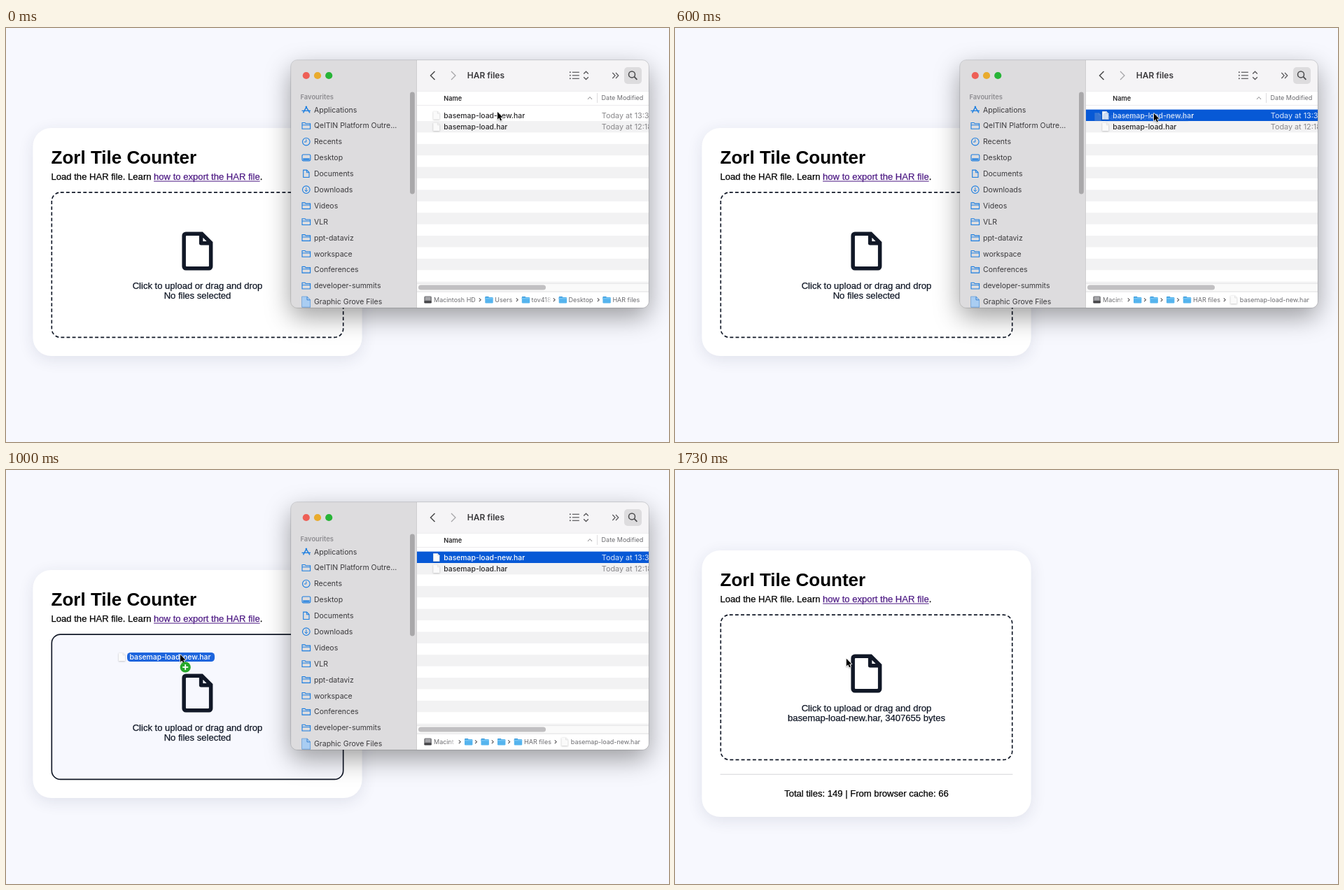
Write an HTML page with a canvas that moves like this. It is 947x592 px and loops after 4270 ms.

```html
<!DOCTYPE html>
<html lang="en">
<head>
<meta charset="utf-8">
<title>Tile Counter</title>
<style>
  html, body { margin: 0; width: 100%; height: 100%; overflow: hidden; background: #f7f8fe; }
  canvas { display: block; width: 947px; height: 592px; }
</style>
</head>
<body>
<canvas id="stage"></canvas>
<script>
const W = 947, H = 592, LOOP = 4270;
const canvas = document.getElementById('stage');
const c = canvas.getContext('2d');
const scale = Math.max(1, window.devicePixelRatio || 1);
canvas.width = W * scale;
canvas.height = H * scale;

const PAGE_FONT = '"Liberation Sans", Arial, sans-serif';
const UI_FONT = 'Inter, "Open Sans", sans-serif';
const BACK = '#f7f8fe', INK = '#111827', BLUE = '#1a7de0', FILE = 'basemap-load-new.har';

// time, pointer x, y
const POINTER = [
  [0, 702, 120], [130, 702, 119.5], [330, 701, 119], [400, 700.5, 119],
  [600, 684, 122], [660, 625, 136], [730, 544, 156], [800, 466, 181],
  [870, 385, 212], [930, 306, 246], [1000, 249, 264], [1070, 248, 264.5],
  [1130, 247, 266], [1200, 246, 268], [1270, 244.8, 269.7]
];
// time, dragged label x, y, opacity
const DRAG = [
  [600, 615, 127, .2], [660, 575, 135, .35], [730, 512, 149, .5], [800, 432, 172, .65],
  [870, 335, 208, .85], [930, 245, 246, .95], [1000, 176.5, 267.5, 1], [1070, 175.5, 268.5, 1],
  [1130, 174.5, 270, 1], [1200, 173, 272, 1], [1270, 171.5, 273, 1]
];
const SELECT = 200, HOVER = 930, DROP = 1670, RESULT = 1730;

const stepAt = (steps, t) => steps.filter(s => s[0] <= t).pop();

function rr(x, y, w, h, r) {
  c.beginPath();
  c.roundRect(x, y, w, h, r);
}

function fillRR(x, y, w, h, r, color) {
  rr(x, y, w, h, r);
  c.fillStyle = color;
  c.fill();
}

function rect(x, y, w, h, color) {
  c.fillStyle = color;
  c.fillRect(x, y, w, h);
}

function disc(x, y, r, color) {
  c.beginPath();
  c.arc(x, y, r, 0, 7);
  c.fillStyle = color;
  c.fill();
}

function line(points, color, width = 1, closed = false) {
  c.beginPath();
  for (let i = 0; i < points.length; i += 2) c.lineTo(points[i], points[i + 1]);
  if (closed) c.closePath();
  c.strokeStyle = color;
  c.lineWidth = width;
  c.stroke();
}

function text(s, x, y, font, color, align = 'left') {
  c.font = font;
  c.fillStyle = color;
  c.textAlign = align;
  c.fillText(s, x, y);
}

// y is the middle of the capitals
function label(s, x, y, size, color, weight = 400) {
  text(s, x, y + size * .36, `${weight} ${size}px ${UI_FONT}`, color);
}

function fadingLabel(s, x, y, size, width) {
  const g = c.createLinearGradient(x, 0, x + width, 0);
  g.addColorStop(0, '#6c6c70');
  g.addColorStop(.65, '#6c6c70');
  g.addColorStop(1, 'rgba(108,108,112,0)');
  label(s, x, y, size, g);
}

function shadow(color, blur, dy) {
  c.shadowColor = color;
  c.shadowBlur = blur * scale;
  c.shadowOffsetY = dy * scale;
}

// ---------- web page ----------
const ICON = new Path2D('M6 2h8.7L20 7.3V20a2 2 0 0 1-2 2H6a2 2 0 0 1-2-2V4a2 2 0 0 1 2-2z' +
  'M6.4 4a.4.4 0 0 0-.4.4v15.2a.4.4 0 0 0 .4.4h11.2a.4.4 0 0 0 .4-.4V8.9h-4.1a1 1 0 0 1-1-1V4z' +
  'M14.9 5v1.9h1.9z');

// a hairline stroke gives the page text its slightly heavier look
function pageText(s, x, y, color, align) {
  text(s, x, y, `13.05px ${PAGE_FONT}`, color, align);
  c.strokeStyle = color;
  c.lineWidth = .25;
  c.strokeText(s, x, y);
  return c.measureText(s).width;
}

function dropZone(top, hover) {
  const x = 65.3, y = top + 92.1, w = 416.4, h = 207.3, r = 12.5;
  rr(x, y, w, h, r);
  c.strokeStyle = INK;
  c.lineWidth = 1.65;
  if (hover) {
    c.fillStyle = BACK;
    c.fill();
  } else {
    const length = 2 * (w + h) - 8 * r + 2 * Math.PI * r;
    const dash = 4.9, count = Math.round(length / 8.125);
    c.setLineDash([dash, length / count - dash]);
  }
  c.stroke();
  c.setLineDash([]);
}

function page(t) {
  const done = t >= RESULT, top = done ? 115 : 143;
  c.save();
  shadow('rgba(40,45,80,.11)', 22, 5);
  fillRR(38.4, top, 470.2, done ? 381 : 326, 26, '#fff');
  c.restore();

  text('Zorl Tile Counter', 64.6, top + 50.8, `bold 26px ${PAGE_FONT}`, '#000');
  const base = top + 74.1, linkColor = '#4f1c85';
  let x = 64.6 + pageText('Load the HAR file. Learn ', 64.6, base, '#000');
  const linkWidth = pageText('how to export the HAR file', x, base, linkColor);
  rect(x, base + 1.5, linkWidth, 1, linkColor);
  pageText('.', x + linkWidth, base, '#000');

  dropZone(top, t >= HOVER && t < DROP);
  c.save();
  c.translate(251.4 - 4 * 2.75, top + 148.5 - 2 * 2.75);
  c.scale(2.75, 2.75);
  c.fillStyle = INK;
  c.fill(ICON, 'evenodd');
  c.restore();
  pageText('Click to upload or drag and drop', 273.5, top + 229.7, INK, 'center');
  pageText(t < DROP ? 'No files selected' : FILE + ', 3407655 bytes', 273.5, top + 244.4, INK, 'center');

  if (done) {
    rect(64.6, 434.7, 417.8, 1, '#d3d4d8');
    pageText('Total tiles: 149 | From browser cache: 66', 273.5, 466.5, '#000', 'center');
  }
}

// ---------- file browser ----------
const sideIcons = {
  apps(y) {
    line([424.5, y + 4.5, 429.6, y - 5], BLUE, 1.4);
    line([434, y + 4.5, 428, y - 5], BLUE, 1.4);
    line([422.5, y + 1.6, 435, y + 1.6], BLUE, 1.4);
  },
  folder(y) {
    line([423, y - 4.2, 427, y - 4.2, 428.2, y - 3, 434.6, y - 3, 434.6, y + 4.5, 423, y + 4.5], BLUE, 1.1, true);
    line([423, y - .9, 434.6, y - .9], BLUE, 1);
  },
  ring(y) {
    c.beginPath();
    c.arc(428.8, y, 5.3, 0, 7);
    c.strokeStyle = BLUE;
    c.lineWidth = 1.1;
    c.stroke();
  },
  clock(y) {
    this.ring(y);
    line([428.8, y - 3.4, 428.8, y + .4, 425.8, y + .4], BLUE, 1);
  },
  desktop(y) {
    rr(423, y - 4.4, 11.8, 8.8, 1.5);
    c.strokeStyle = BLUE;
    c.lineWidth = 1.1;
    c.stroke();
    rect(424.2, y + 1, 9.4, 2.2, BLUE);
  },
  doc(y) {
    line([424.7, y - 5.2, 429.6, y - 5.2, 433, y - 1.8, 433, y + 5.2, 424.7, y + 5.2], BLUE, 1.1, true);
    line([429.4, y - 5, 429.4, y - 1.6, 433, y - 1.6], BLUE, 1);
  },
  download(y) {
    this.ring(y);
    line([428.8, y - 3, 428.8, y + 2.6], BLUE, 1);
    line([426.6, y + .4, 428.8, y + 2.7, 431, y + .4], BLUE, 1);
  },
  sheet(y) {
    c.fillStyle = '#a9cdf2';
    line([423, y - 7, 430, y - 7, 434.5, y - 2.5, 434.5, y + 7.5, 423, y + 7.5], '#3b82cf', 1.1, true);
    c.fill();
    line([430, y - 7, 430, y - 2.5, 434.5, y - 2.5], '#3b82cf', 1);
  }
};

const SIDEBAR = [
  ['apps', 'Applications'], ['folder', 'QelTIN Platform Outre...'], ['clock', 'Recents'],
  ['desktop', 'Desktop'], ['doc', 'Documents'], ['download', 'Downloads'],
  ['folder', 'Videos'], ['folder', 'VLR'], ['folder', 'ppt-dataviz'],
  ['folder', 'workspace'], ['folder', 'Conferences'], ['folder', 'developer-summits'],
  ['sheet', 'Graphic Grove Files']
];

function sidebar() {
  rect(407, 46, 179.5, 354, '#dddcde');
  ['#ee5f56', '#e9ab2d', '#27b437'].forEach((color, i) => disc(428.8 + i * 16.2, 68, 5.1, color));
  label('Favourites', 420.5, 98.3, 9.4, '#8d8c90', 600);
  SIDEBAR.forEach(([icon, name], i) => {
    const y = 116.8 + i * 22.88;
    sideIcons[icon](y);
    label(name, 440, y, 10.5, '#3a393c');
  });
  fillRR(577, 91.5, 6.8, 146, 3.4, '#a9a8aa');
  rect(586, 46, 1, 354, '#cfced0');
}

function toolbar() {
  rect(587, 46, 331, 44, '#f5f4f6');
  line([612.5, 62, 606.5, 68, 612.5, 74], '#4a4a4c', 1.5);
  line([636, 62, 642, 68, 636, 74], '#a5a5a8', 1.3);
  label('HAR files', 658.8, 68, 12, '#3a393c', 600);
  for (const y of [63.3, 67.8, 72.3]) {
    disc(805.8, y, 1, '#59585b');
    rect(808.8, y - .6, 10, 1.2, '#59585b');
  }
  line([825.2, 65.6, 828.5, 62.3, 831.8, 65.6], '#59585b', 1.4);
  line([825.2, 70.2, 828.5, 73.5, 831.8, 70.2], '#59585b', 1.4);
  for (const x of [866.3, 871]) line([x, 64, x + 3.8, 68, x, 72], '#59585b', 1.2);
  fillRR(883, 56, 25, 24, 5, '#dddcde');
  c.beginPath();
  c.arc(894, 66.4, 4.5, 0, 7);
  c.strokeStyle = '#4a4a4c';
  c.lineWidth = 1.5;
  c.stroke();
  line([897.3, 69.7, 901.4, 73.8], '#4a4a4c', 1.7);
}

function pageIcon(x, y) {
  c.save();
  shadow('rgba(0,0,0,.3)', 2, .5);
  c.beginPath();
  c.moveTo(x - 4.6, y - 5.8);
  c.lineTo(x + 1.6, y - 5.8);
  c.lineTo(x + 4.6, y - 2.8);
  c.lineTo(x + 4.6, y + 5.8);
  c.lineTo(x - 4.6, y + 5.8);
  c.fillStyle = '#fafafa';
  c.fill();
  c.restore();
  line([x + 1.6, y - 5.8, x + 1.6, y - 2.8, x + 4.6, y - 2.8], '#d8d8da', .7);
}

function fileList(selected) {
  const pitch = 16.4, first = 116.6;
  rect(587, 90, 331, 310, '#fff');
  for (let i = 1; i < 16; i += 2) rect(587, first + i * pitch, 331, pitch, '#f2f2f3');
  if (selected) rect(587, first, 331, pitch, '#0759d6');
  [[FILE, 'Today at 13:37'], ['basemap-load.har', 'Today at 12:18']].forEach(([name, date], i) => {
    const y = 125 + i * pitch, on = selected && i === 0;
    pageIcon(614.8, y);
    label(name, 625.2, y, 10.4, on ? '#fff' : '#29282a', 500);
    label(date, 850.8, y, 10.8, on ? '#dce8fb' : '#88878a');
  });

  rect(587, 89.5, 331, 1, '#dedddf');
  label('Name', 625.2, 100.2, 9.2, '#29282a', 600);
  line([831, 102, 834, 98.6, 837, 102], '#88878a', 1);
  rect(844, 93, 1, 14, '#dedddf');
  label('Date Modified', 850.6, 100.2, 9, '#6c6c70');
  rect(587, 110, 331, .7, '#e4e3e5');

  rect(587, 365.5, 331, 11.5, '#fafafa');
  rect(587, 365, 331, .8, '#e6e6e8');
  fillRR(589, 367.6, 182, 7, 3.5, '#c1c0c2');
}

function smallFolder(x) {
  fillRR(x, 384, 5.5, 4, 1, '#3593d6');
  fillRR(x, 385, 11.4, 8.4, 1.2, '#55b4ee');
  rect(x, 386.4, 11.4, .8, '#8dd0f7');
}

function drive() {
  fillRR(597.3, 383.5, 10.6, 10.2, 1.5, '#77777a');
  rect(598.8, 384.5, 7.6, 5, '#a5a5a9');
  rect(597.6, 390.4, 10, 2.6, '#434346');
}

function pathBar(selected) {
  const y = 388.7, size = 9, gray = '#6c6c70';
  rect(587, 377, 331, 23, '#fff');
  rect(587, 376.6, 331, .9, '#dcdbdd');
  drive();
  const arrows = selected ? [648, 671.3, 695, 718.5, 785] : [677, 730, 783, 846];
  const folders = selected ? [655, 678.5, 702, 725.8] : [684.3, 736.8, 789.7, 852.4];
  arrows.forEach(x => line([x - 1.2, y - 2.4, x + 1.2, y, x - 1.2, y + 2.4], '#59585b', 1.1));
  folders.forEach(smallFolder);
  if (selected) {
    fadingLabel('Macint', 611, y, size, 33);
    label('HAR files', 740, y, size, gray);
    pageIcon(798, y);
    label(FILE, 806.8, y, size, gray);
  } else {
    label('Macintosh HD', 611, y, size, gray);
    label('Users', 698.3, y, size, gray);
    fadingLabel('tov418', 750.6, y, size, 29);
    label('Desktop', 803.4, y, size, gray);
    label('HAR files', 866.4, y, size, gray);
  }
}

function browser(t) {
  const selected = t >= SELECT;
  c.save();
  shadow('rgba(0,0,0,.38)', 36, 13);
  fillRR(407, 46, 511, 354, 9, '#fff');
  c.restore();
  c.save();
  rr(407, 46, 511, 354, 9);
  c.clip();
  fileList(selected);
  pathBar(selected);
  toolbar();
  sidebar();
  c.restore();
  rr(406.7, 45.7, 511.6, 354.6, 9.3);
  c.strokeStyle = 'rgba(0,0,0,.2)';
  c.lineWidth = .7;
  c.stroke();
}

// ---------- dragging ----------
function dragged(t) {
  const step = stepAt(DRAG, t);
  if (!step || t >= DROP) return;
  const [, x, y, alpha] = step;
  c.save();
  c.globalAlpha = alpha;
  pageIcon(x - 11, y);
  fillRR(x - 3.5, y - 6.6, 125, 13.2, 5, '#1d65dd');
  label(FILE, x, y, 10.4, '#fff', 500);
  c.restore();
}

const ARROW = new Path2D('M0 0V10.8L2.4 8.6L4.2 12.5L6 11.7L4.3 7.8H7.6Z');

function pointer(t) {
  const [, x, y] = stepAt(POINTER, t);
  c.save();
  c.translate(x, y);
  c.lineJoin = 'round';
  c.strokeStyle = '#fff';
  c.lineWidth = 1.5;
  shadow('rgba(0,0,0,.3)', 2, 1);
  c.stroke(ARROW);
  shadow('transparent', 0, 0);
  c.fillStyle = '#000';
  c.fill(ARROW);
  c.restore();
  if (t >= HOVER && t < DROP) {
    const bx = x + 7.2, by = y + 17.9;
    disc(bx, by, 7.6, '#27a82b');
    rect(bx - 4, by - .9, 8, 1.8, '#fff');
    rect(bx - .9, by - 4, 1.8, 8, '#fff');
  }
}

function draw() {
  const t = performance.now() % LOOP;
  c.setTransform(scale, 0, 0, scale, 0, 0);
  rect(0, 0, W, H, BACK);
  page(t);
  if (t < DROP) browser(t);
  dragged(t);
  pointer(t);
  requestAnimationFrame(draw);
}
draw();
</script>
</body>
</html>
```
